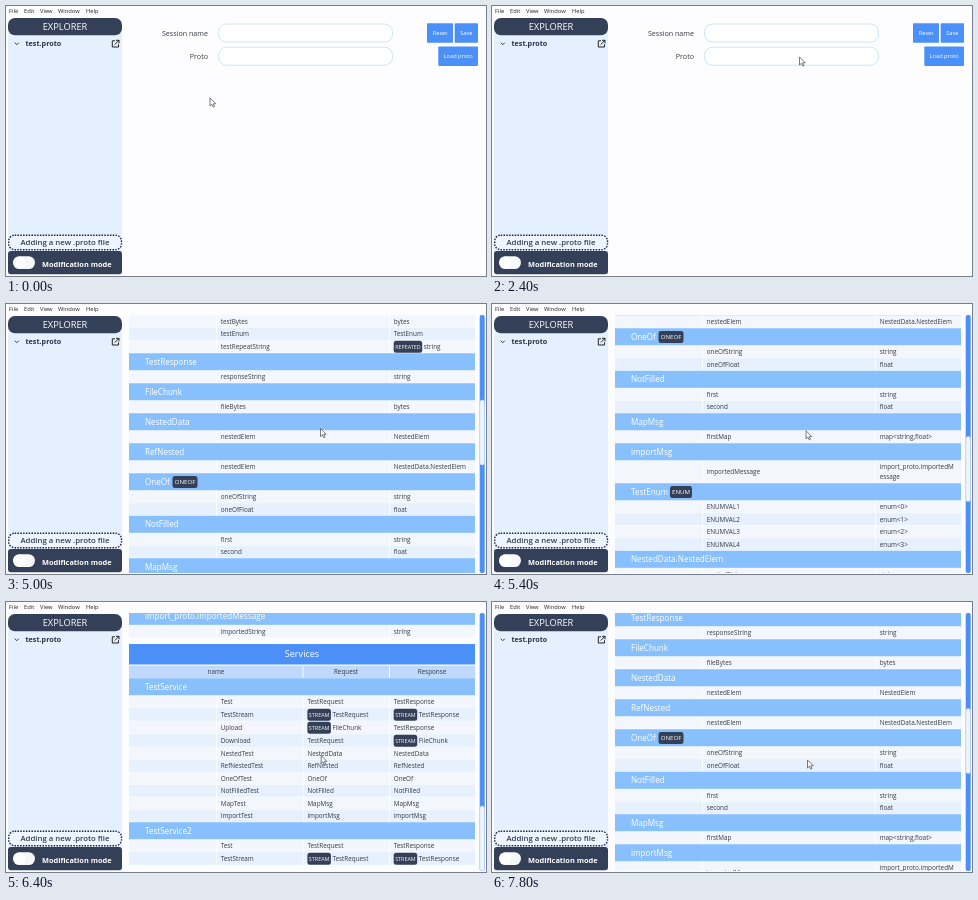
An HTML page that plays this animation: 480x270 px, repeating every 8 s.

```html
<!DOCTYPE html>
<html lang="en">
<head>
<meta charset="utf-8">
<title>Proto explorer</title>
<style>
  html, body { margin: 0; width: 100%; height: 100%; overflow: hidden; background: #fdfdff; }
  svg { display: block; width: 100vw; height: 100vh; }
  text { font-family: "Open Sans", "Noto Sans", sans-serif; white-space: pre; }
</style>
</head>
<body>
<svg id="stage" viewBox="0 0 480 270"></svg>
<script>
const BLUE = '#4b8ff8', SKY = '#88c0fd', PALE = '#c0d8fb', DARK = '#344058', INK = '#363a43';
const ROW = 12.5, TAGGED_ROW = 13, WRAPPED_ROW = 22.5, SECTION = 17.5;
const LEFT = 123, RIGHT = 469, TOP = 11, VIEW = 258, MAX_SCROLL = 766.5;
const LOOP = 8000, STEP = 200, LOADED_AT = 3200;
const TAG_WIDTH = { REPEATED: 28.5, STREAM: 23.5, ENUM: 22, ONEOF: 25 };

const rect = (x, y, w, h, fill, r = 0, extra = '') =>
  `<rect x="${x}" y="${y}" width="${w}" height="${h}" rx="${r}" fill="${fill}" ${extra}/>`;

// y is the vertical middle of the capitals
const text = (x, y, size, content, fill = INK, anchor = 'start', weight = 400) =>
  `<text x="${x}" y="${y + size * 0.36}" font-size="${size}" fill="${fill}" text-anchor="${anchor}" font-weight="${weight}">${
    content.replace(/</g, '&lt;')}</text>`;

const tag = (x, y, name, size) => {
  const w = TAG_WIDTH[name];
  return rect(x, y - 6.1, w, 12.2, DARK, 2.5) + text(x + w / 2, y, size, name, '#fff', 'middle');
};

function cell(x, y, content) {
  const [, name, rest] = content.match(/^(?:\[(\w+)\] )?([^]*)$/);
  if (name) return tag(x, y, name, 5.4) + text(x + TAG_WIDTH[name] + 1.5, y, 6.35, rest);
  const lines = rest.split('\n');
  return lines.map((line, i) => text(x, y + (i - (lines.length - 1) / 2) * 10, 6.35, line)).join('');
}

const scalars = 'Double Float Int32 Int64 Uint32 Uint64 Sint32 Sint64 Fixed32 Fixed64 Sfixed32 Sfixed64 Bool String Bytes'.split(' ');
const messages = [
  ['TestRequest', ...scalars.map(s => ['test' + s, s.toLowerCase()]),
    ['testEnum', 'TestEnum'], ['testRepeatString', '[REPEATED] string']],
  ['TestResponse', ['responseString', 'string']],
  ['FileChunk', ['fileBytes', 'bytes']],
  ['NestedData', ['nestedElem', 'NestedElem']],
  ['RefNested', ['nestedElem', 'NestedData.NestedElem']],
  ['OneOf|ONEOF|166.5', ['oneOfString', 'string'], ['oneOfFloat', 'float']],
  ['NotFilled', ['first', 'string'], ['second', 'float']],
  ['MapMsg', ['firstMap', 'map<string,float>']],
  ['importMsg', ['importedMessage', 'import_proto.importedM\nessage']],
  ['TestEnum|ENUM|178', ...[0, 1, 2, 3].map(i => ['ENUMVAL' + (i + 1), `enum<${i}>`])],
  ['NestedData.NestedElem', ['nestedString', 'string'], ['nestedRepeatedString', '[REPEATED] string']],
  ['import_proto.importedMessage', ['importedString', 'string']]
];
const unary = ['Test', 'TestRequest', 'TestResponse'];
const stream = ['TestStream', '[STREAM] TestRequest', '[STREAM] TestResponse'];
const services = [
  ['TestService', unary, stream,
    ['Upload', '[STREAM] FileChunk', 'TestResponse'],
    ['Download', 'TestRequest', '[STREAM] FileChunk'],
    ...['Nested:NestedData', 'RefNested:RefNested', 'OneOf:OneOf', 'NotFilled:NotFilled', 'Map:MapMsg', 'Import:importMsg']
      .map(s => s.split(':')).map(([name, type]) => [name + 'Test', type, type])],
  ['TestService2', unary, stream]
];

function buildTables() {
  let y = 69, out = '';
  const heading = title => {
    out += rect(LEFT, y, RIGHT - LEFT, 20.5, BLUE) + text(296, y + 10.2, 9.1, title, '#fff', 'middle');
    y += 21.75;
  };
  const row = (cells, columns, index) => {
    const all = cells.join();
    const h = all.includes('\n') ? WRAPPED_ROW : all.includes('[') ? TAGGED_ROW : ROW;
    out += rect(LEFT, y, RIGHT - LEFT, h - 0.4, index % 2 ? '#e7f0fd' : '#f3f7fd');
    cells.forEach((content, i) => {
      if (columns[i] > LEFT + 10) out += rect(columns[i] - 4.7, y, 0.8, h, '#fff');
      out += cell(columns[i], y + h / 2, content);
    });
    y += h;
  };
  const table = (title, sections, columns, labels) => {
    y += 6.25;
    heading(title);
    out += rect(LEFT, y, RIGHT - LEFT, ROW - 0.3, PALE);
    labels.forEach(([label, x], i) => {
      out += text(x, y + 6.2, 6.35, label, INK, 'middle');
      if (i) out += rect(columns[i] - 4.7, y, 0.8, ROW, '#fff');
    });
    y += ROW;
    for (const [header, ...rows] of sections) {
      const [name, badge, badgeX] = header.split('|');
      out += rect(LEFT, y, RIGHT - LEFT, SECTION - 0.4, SKY) + text(139, y + 8.75, 8.1, name, '#fff');
      if (badge) out += tag(+badgeX, y + 8.75, badge, 6.1);
      y += SECTION;
      rows.forEach((cells, i) => row(cells, columns, i));
    }
  };

  heading('Proto files');
  ['test', 'import'].forEach((file, i) =>
    row([`D:/github_desktop/grpc_man/src/components/test_proto/${file}.proto`], [127.5], i));
  table('Messages', messages, [214.7, 387.7], [['name', 253], ['type', 426]]);
  table('Services', services, [214.7, 301.4, 387.7], [['name', 210], ['Request', 340], ['Response', 426]]);
  return out;
}

const button = (x, y, w, label) =>
  rect(x, y, w, 19.5, BLUE, 0.8) + text(x + w / 2, y + 9.9, 5.7, label, '#fff', 'middle');

function buildForm(loaded) {
  const [labelX, fieldX, fieldW, edge] = loaded ? [200.5, 211.5, 171.5, 467.3] : [202, 212.5, 174, 472];
  const field = y => rect(fieldX, y, fieldW, 18, '#fff', 8, 'stroke="#c3dfee" stroke-width=".8"');
  let out = text(labelX, 27.5, 7.15, 'Session name', INK, 'end') + text(labelX, 50.5, 7.15, 'Proto', INK, 'end')
    + field(18) + field(41.2)
    + button(edge - 51, 17.3, 26, 'Reset') + button(edge - 23.3, 17.3, 23.3, 'Save')
    + button(edge - 39.7, 40.4, 39.7, 'Load proto');
  if (loaded) {
    const path = ['D:', 'github_desktop', 'grpc_man', 'src', 'components', 'test_proto', ''].join('₩');
    out += text(217, 27.5, 5.6, 'test.proto')
      + `<g clip-path="url(#field)">${text(217, 50.4, 5.6, path)}</g>`;
  }
  return out;
}

function buildSidebar() {
  const menu = [['File', 3], ['Edit', 18], ['View', 34], ['Window', 52], ['Help', 80]];
  return menu.map(([label, x]) => text(x, 4.8, 5.75, label, '#222')).join('')
    + rect(2, 12, 114, 256, '#e5f0fe', 6)
    + rect(2, 12, 114, 17.3, DARK, 7) + text(59, 20.8, 9.3, 'EXPLORER', '#fff', 'middle')
    + '<path d="M8.8 36.7l2 2 2-2" fill="none" stroke="#222" stroke-width=".9"/>'
    + text(19.5, 37.5, 7.2, 'test.proto', '#26334a', 'start', 700)
    + '<path d="M109 34.8h-2.7v6.2h6.2v-2.7M110 34.3h3v3M113 34.3l-4.2 4.2" fill="none" stroke="#222" stroke-width="1"/>'
    + rect(2.7, 229.2, 112.8, 14.5, '#eef5ff', 6, 'stroke="#1d2740" stroke-width="1.4" stroke-dasharray="1.5 1.3"')
    + text(59, 236.5, 7.8, 'Adding a new .proto file', '#303c52', 'middle', 600)
    + rect(2, 245, 114, 23.3, DARK, 3)
    + rect(7, 250.2, 22, 12.8, '#f6f7f9', 6.4) + '<circle cx="13.4" cy="256.6" r="6" fill="#fff"/>'
    + text(36, 258.1, 7.4, 'Modification mode', '#fff', 'start', 700);
}

const thumbHeight = VIEW * VIEW / (VIEW + MAX_SCROLL);
document.getElementById('stage').innerHTML = `
  <defs>
    <clipPath id="view"><rect x="117" y="${TOP}" width="363" height="${VIEW}"/></clipPath>
    <clipPath id="field"><rect x="215" y="41" width="163.5" height="18"/></clipPath>
  </defs>
  ${rect(0, 0, 480, 270, '#fdfdff')}
  <g id="empty">${buildForm(false)}</g>
  <g id="loaded">
    <g clip-path="url(#view)"><g id="page">${buildForm(true)}${buildTables()}</g></g>
    ${rect(473.7, TOP, 5, VIEW, BLUE, 2)}
    ${rect(474, TOP, 4.4, thumbHeight, '#f1f6fe', 2, 'id="thumb" stroke="#b9d4fb" stroke-width=".5"')}
  </g>
  ${buildSidebar()}
  <path id="cursor" d="M0 0v8l1.9-1.7 1.3 2.8 1.3-.6-1.3-2.7h2.5z" fill="#fff" stroke="#444" stroke-width=".7"/>`;

const [empty, loaded, page, thumb, cursor] =
  ['empty', 'loaded', 'page', 'thumb', 'cursor'].map(id => document.getElementById(id));

// Keys are [time, ...values]
const cursorKeys = [[0, 204, 92], [2400, 307.5, 51], [3000, 109, 36], [3200, 109, 36], [4000, 303, 39],
  [4400, 312, 100], [5000, 314.5, 124.5], [5800, 313.5, 129], [6600, 315.5, 158], [LOOP, 315.5, 158]];
const scrollKeys = [[0, 0], [4200, 0], [5000, 337.5], [5800, 627.5], [6400, MAX_SCROLL],
  [7200, MAX_SCROLL], [7800, 379.5], [LOOP, 379.5]];

function sample(keys, t, ease = p => p) {
  const i = keys.findIndex(key => key[0] > t);
  const [from, to] = [keys[i - 1], keys[i]];
  const p = ease((t - from[0]) / (to[0] - from[0]));
  return from.slice(1).map((v, k) => v + (to[k + 1] - v) * p);
}

const smooth = p => p * p * (3 - 2 * p);
const show = (node, visible) => node.setAttribute('visibility', visible ? 'visible' : 'hidden');

function render(now) {
  const t = Math.floor(now % LOOP / STEP) * STEP;
  const [scroll] = sample(scrollKeys, t);
  show(empty, t < LOADED_AT);
  show(loaded, t >= LOADED_AT);
  page.setAttribute('transform', `translate(0 ${-scroll})`);
  thumb.setAttribute('y', TOP + scroll * VIEW / (VIEW + MAX_SCROLL));
  cursor.setAttribute('transform', `translate(${sample(cursorKeys, t, smooth)})`);
}

const start = performance.now();
function frame() {
  render(performance.now() - start);
  requestAnimationFrame(frame);
}
frame();
</script>
</body>
</html>
```
